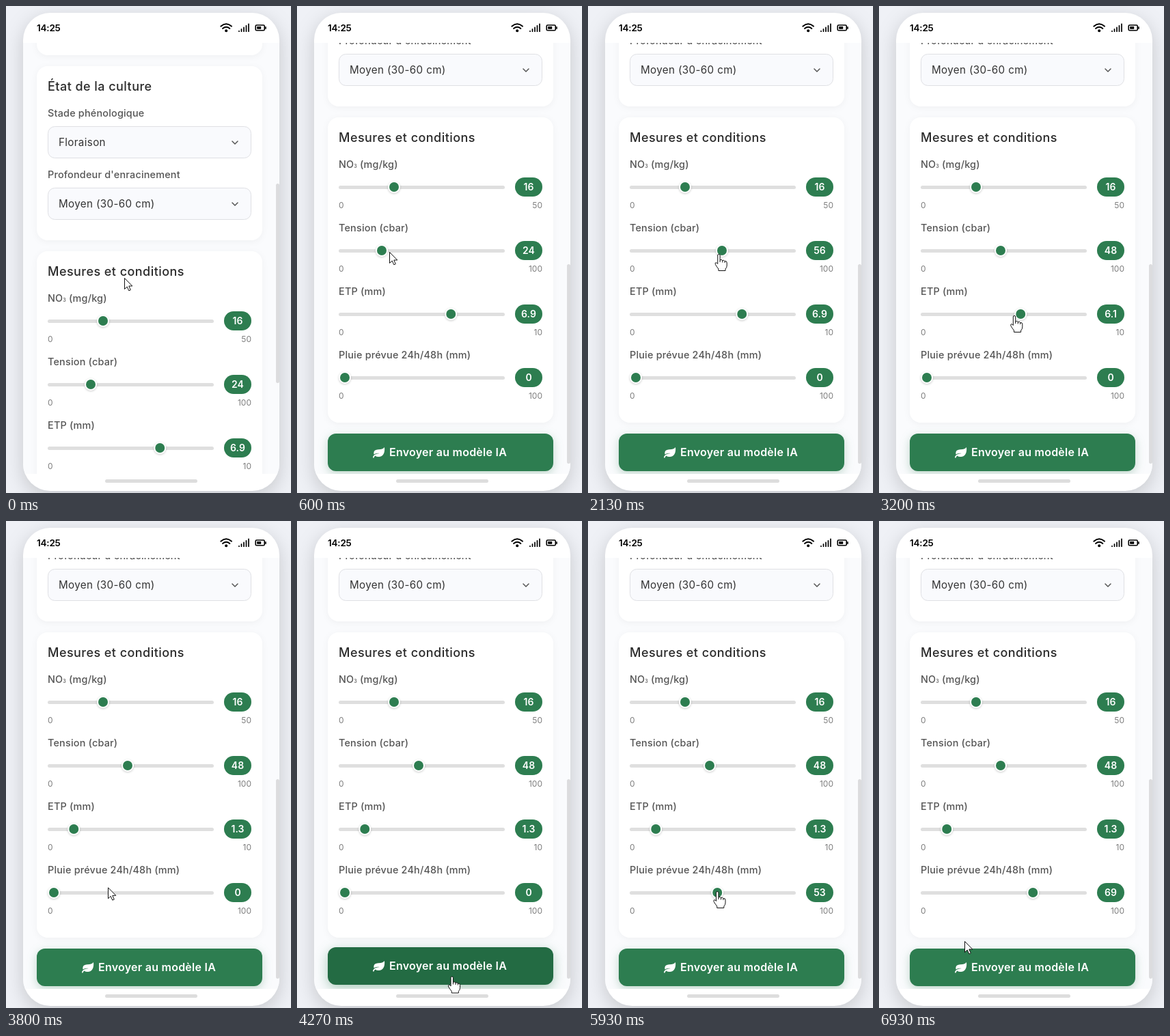
An HTML page that plays this animation: 417 by 713 pixels, repeating every 7000 ms.

```html
<!DOCTYPE html>
<html lang="fr">
<head>
<meta charset="utf-8">
<title>Mesures et conditions</title>
<style>
  html, body { margin: 0; width: 100%; height: 100%; overflow: hidden; background: #eff1f6; }
  svg { display: block; font-family: Inter, "Noto Sans", sans-serif; }
  .phone { fill: #fff; filter: drop-shadow(0 8px 14px rgba(0, 0, 0, .17)); }
  .card { fill: #fff; filter: drop-shadow(0 2px 5px rgba(0, 0, 0, .045)); }
  .title { font-size: 18px; font-weight: 500; fill: #2a2a2a; letter-spacing: .45px; }
  .label { font-size: 14.4px; font-weight: 500; fill: #555; letter-spacing: .2px; }
  .option { font-size: 15.2px; fill: #333; letter-spacing: .35px; }
  .limit { font-size: 12px; fill: #7d7d7d; }
  .end { text-anchor: end; }
  .badge { font-size: 14px; font-weight: 600; fill: #fff; text-anchor: middle; }
  .field { fill: #f9fafd; stroke: #dfe0e4; }
  .green { fill: #2d7d50; }
  .knob { filter: drop-shadow(0 1px 1.5px rgba(0, 0, 0, .2)); }
  .line { fill: none; stroke-linecap: round; stroke-linejoin: round; }
  .send { font-size: 16px; font-weight: 600; fill: #fff; letter-spacing: .25px; }
  .clock { font-size: 13.5px; font-weight: 600; letter-spacing: -.2px; }
  .cursor path { fill: #fff; stroke: #111; stroke-linejoin: round; }
</style>
</head>
<body>
<svg width="417" height="713" viewBox="0 0 417 713">
  <defs>
    <clipPath id="body"><rect x="25" y="10" width="375" height="700" rx="40"/></clipPath>
    <clipPath id="view" clip-path="url(#body)"><rect x="25" y="54" width="375" height="631"/></clipPath>
  </defs>
  <rect class="phone" x="25" y="10" width="375" height="700" rx="40"/>
  <g clip-path="url(#view)">
    <rect x="25" y="54" width="375" height="631" fill="#fafbfd"/>
    <g id="page">
      <rect class="card" x="45" y="-60" width="330" height="132" rx="16"/>
      <rect class="card" x="45" y="88" width="330" height="255" rx="16"/>
      <text class="title" x="61" y="124">État de la culture</text>
      <g id="fields"></g>
      <rect class="card" x="45" y="359" width="330" height="447" rx="16"/>
      <text class="title" x="61" y="395">Mesures et conditions</text>
      <g id="sliders"></g>
      <g id="button">
        <rect id="face" x="45" y="822" width="330" height="55" rx="12"/>
        <path fill="#fff" d="M128 842C129 850 126 856 119.500 856Q116 856 114.500 854.500Q112.500 856 112.500 857.500Q111 858 111 856.500C112 853 116 851.300 121 851Q116 850 112.500 852.500C111.500 847 115 845.500 119 845.300Q125 845.500 128 842Z"/>
        <text class="send" x="135" y="855">Envoyer au modèle IA</text>
      </g>
    </g>
    <rect id="bar" x="395" y="260" width="5" height="292" rx="2.500" fill="#dcdcde"/>
  </g>
  <text class="clock" x="45" y="37">14:25</text>
  <g class="line" stroke="#000" stroke-width="1.900">
    <path d="M314.300 29.700Q322.200 22.800 330.100 29.700M317 33Q322.200 28.600 327.400 33"/>
    <path id="signal" stroke-width="1.700"/>
    <rect x="365.200" y="28" width="13" height="7.800" rx="1.500" stroke-width="1.600"/>
    <path d="M380 30.700V33.200" stroke-width="1.600"/>
  </g>
  <circle cx="322.200" cy="36.200" r="2"/>
  <rect x="367.200" y="30" width="6" height="3.800"/>
  <rect x="145" y="693" width="135" height="5" rx="2.500" fill="#ddd"/>
  <g id="cursor" class="cursor">
    <path id="arrow" d="M.5.5V16.500L4.200 13L6.800 18.800L9.300 17.700L6.800 12H11.800Z"/>
    <g id="hand">
      <path d="M-1.700 2Q-1.700.5 0 .5T1.700 2V9Q4 7.300 5.300 9.600Q7.500 8.300 8.600 10.600Q11.800 9.900 11.800 13V17Q11.800 20 9.600 22V24.500H-.5V22Q-3 19-5 15.500Q-6 12.700-4.300 12.700Q-3 12.700-1.700 14.500Z"/>
      <path d="M1.700 9V12M5.300 9.600V12.500M8.600 10.600V13"/>
    </g>
  </g>
</svg>
<script>
const LOOP = 7000, FPS = 15, SCROLL = 196;
const el = id => document.getElementById(id);
const move = (node, x, y) => node.setAttribute("transform", `translate(${x} ${y})`);
const mix = (a, b, k) => a + (b - a) * k;

// Smooth 0 to 1 between two times
function ease(t, start, end) {
  const p = Math.min(1, Math.max(0, (t - start) / (end - start)));
  return p * p * (3 - 2 * p);
}

el("signal").setAttribute("d",
  [0, 1, 2, 3, 4].map(i => `M${341 + 3.5 * i} 37.200v${-0.7 - 2.55 * i}`).join(""));

const fields = [
  ["Stade phénologique", "Floraison"],
  ["Profondeur d'enracinement", "Moyen (30-60 cm)"],
];
el("fields").innerHTML = fields.map(([label, option], i) => {
  const y = 162 + 90 * i;
  return `
  <text class="label" x="61" y="${y}">${label}</text>
  <rect class="field" x="61.500" y="${y + 14.5}" width="297" height="46" rx="10"/>
  <text class="option" x="77" y="${y + 43}">${option}</text>
  <path class="line" stroke="#555" stroke-width="1.500" d="M331 ${y + 36}l4 4l4-4"/>`;
}).join("");

// grip: pointer height relative to the track while dragging
const sliders = [
  { label: 'NO<tspan font-size="7">3</tspan> (mg/kg)', max: 50, digits: 0, value: 16, drags: [] },
  { label: "Tension (cbar)", max: 100, digits: 0, value: 24, grip: 5,
    drags: [{ start: 1000, end: 1670, to: 68 }, { start: 1870, end: 2330, to: 48 }] },
  { label: "ETP (mm)", max: 10, digits: 1, value: 6.9, grip: 2,
    drags: [{ start: 3095, end: 3545, to: 1.3 }] },
  { label: "Pluie prévue 24h/48h (mm)", max: 100, digits: 0, value: 0, grip: -2,
    drags: [{ start: 5467, end: 5933, to: 53 }, { start: 6000, end: 6400, to: 69 }] },
];
sliders.forEach((s, i) => s.y = 461 + 93 * i);
el("sliders").innerHTML = sliders.map(({ label, max, y }) => `
  <text class="label" x="61" y="${y - 28}">${label}</text>
  <rect x="61" y="${y - 2}" width="243" height="5" rx="2.500" fill="#dfdfdf"/>
  <g class="knob"><circle cy="${y}" r="9" fill="#fff"/><circle class="green" cy="${y}" r="7"/></g>
  <rect class="green" x="319" y="${y - 14}" width="40" height="28" rx="14"/>
  <text class="badge" x="339" y="${y + 5}"></text>
  <text class="limit" x="61" y="${y + 31}">0</text>
  <text class="limit end" x="359" y="${y + 31}">${max}</text>`).join("");
const knobs = document.querySelectorAll(".knob");
const badges = document.querySelectorAll(".badge");

const valueAt = (s, t) =>
  s.drags.reduce((v, d) => mix(v, d.to, ease(t, d.start, d.end)), s.value);
const knobX = (s, value) => 70 + 225 * value / s.max;

// The pointer runs slightly ahead of the knob it drags
const LEAD = 30;
const gripPoint = (s, t) =>
  ({ t, x: knobX(s, valueAt(s, t + LEAD)), y: s.y + s.grip - SCROLL });

const stops = [
  { t: 200, x: 173, y: 398 }, { t: 600, x: 135, y: 360 },
  { t: 2570, x: 176, y: 472 },
  { t: 4200, x: 227, y: 667 }, { t: 4733, x: 225, y: 663 }, { t: 5133, x: 198, y: 549 },
  { t: 6733, x: 180, y: 551 }, { t: 6933, x: 125, y: 615 },
];
const grips = sliders.flatMap(s =>
  s.drags.flatMap(d => [gripPoint(s, d.start), gripPoint(s, d.end)]));
const route = [...stops, ...grips].sort((a, b) => a.t - b.t);

function pointerAt(t) {
  const held = sliders.find(s => s.drags.some(d => t >= d.start && t <= d.end));
  if (held) return { ...gripPoint(held, t), held };
  const b = route.find(p => p.t > t) || route[route.length - 1];
  const a = route[Math.max(0, route.indexOf(b) - 1)];
  const k = a === b ? 0 : Math.min(1, (t - a.t) / (b.t - a.t));
  return { x: mix(a.x, b.x, k), y: mix(a.y, b.y, k) };
}

function draw(t) {
  const scrolled = ease(t, 0, 133), scroll = SCROLL * scrolled;
  move(el("page"), 0, -scroll);
  move(el("bar"), 0, 118 * scrolled);

  const { x, y, held } = pointerAt(t);
  let pointing = held || y + scroll > 822;
  sliders.forEach((s, i) => {
    const value = valueAt(s, t).toFixed(s.digits);
    const center = knobX(s, value);
    move(knobs[i], center, 0);
    badges[i].textContent = value;
    if (Math.hypot(x - center, y + scroll - s.y) < 10.5) pointing = true;
  });

  const hover = ease(t, 4070, 4270) - ease(t, 4860, 5140);
  move(el("button"), 0, -2 * hover);
  el("face").style.fill = `rgb(${mix(45, 35, hover)}, ${mix(125, 107, hover)}, ${mix(80, 67, hover)})`;
  el("face").style.filter =
    `drop-shadow(0 ${4 + 2 * hover}px ${7 + 2 * hover}px rgba(45, 125, 80, ${.28 + .1 * hover}))`;

  move(el("cursor"), x, y);
  el("hand").style.display = pointing ? "" : "none";
  el("arrow").style.display = pointing ? "none" : "";
}

const start = performance.now();
function tick() {
  const t = (performance.now() - start) % LOOP;
  // the small lead keeps rounded step times on their own step
  const step = Math.floor((t + 10) * FPS / 1000) % (LOOP * FPS / 1000);
  draw(step * 1000 / FPS);
  requestAnimationFrame(tick);
}
tick();
</script>
</body>
</html>
```
